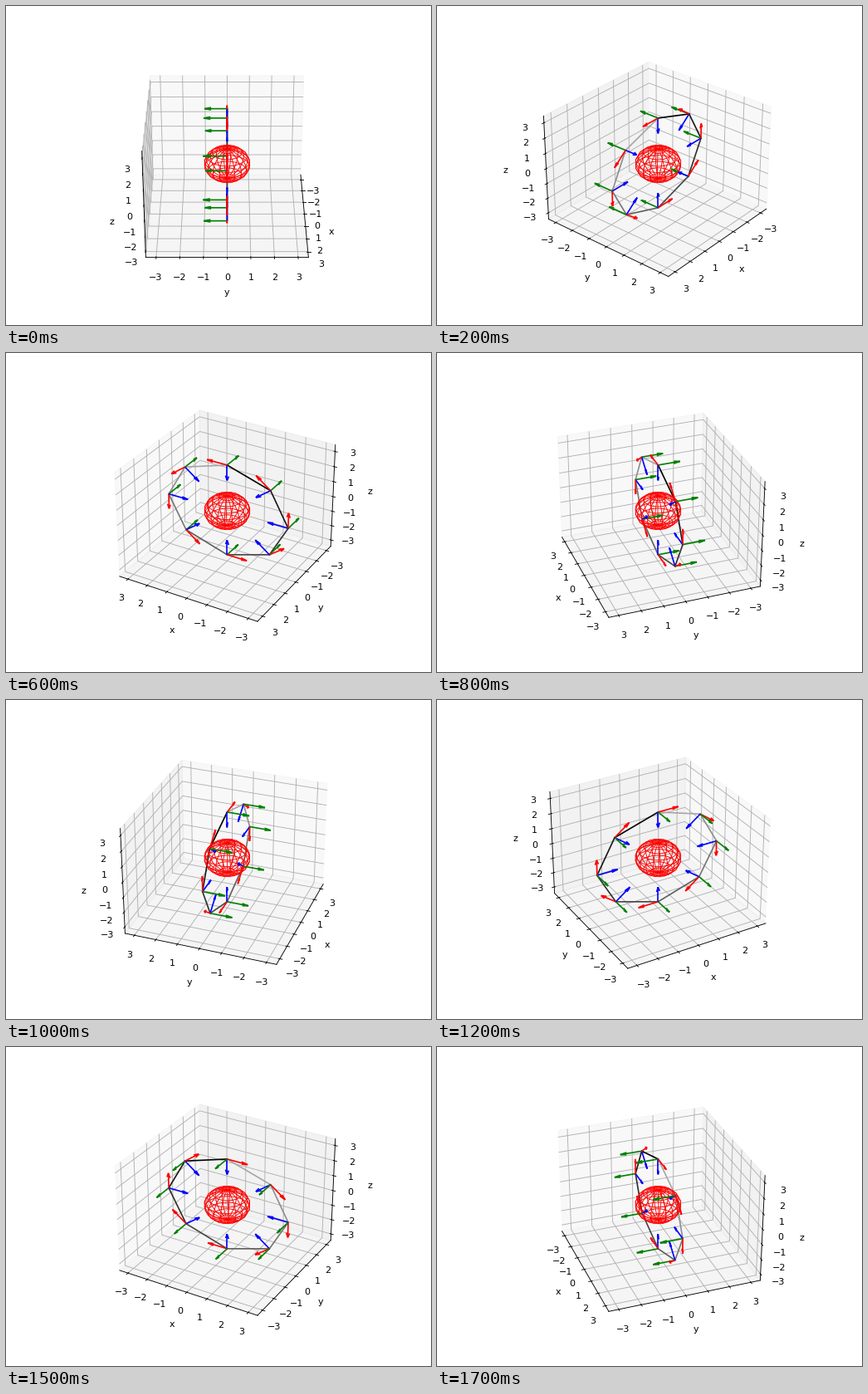
These frames come from a looping animation (512x384 px, 1.8 s). A matplotlib script:

```python
import numpy as np
import matplotlib.pyplot as plt
from matplotlib.animation import FuncAnimation

FRAMES, INTERVAL = 18, 100
NODES, RADIUS = 8, 3.0
LIMIT = RADIUS * 1.1 * 25 / 24  # a little air around the ring

fig = plt.figure(figsize=(6.4, 4.8), dpi=80)
ax = fig.add_subplot(projection="3d")

# Wireframe ball in the middle
u, v = np.mgrid[0:2 * np.pi:20j, 0:np.pi:10j]
ax.plot_wireframe(np.cos(u) * np.sin(v), np.sin(u) * np.sin(v), np.cos(v),
                  color="r", linewidth=0.8)

# Ring of poses in the x-z plane, each looking at the centre
theta = np.arange(NODES) * 2 * np.pi / NODES
zero = np.zeros(NODES)
radial = np.array([np.sin(theta), zero, np.cos(theta)])
tangent = np.array([np.cos(theta), zero, -np.sin(theta)])
down = np.array([zero, zero - 1, zero])
nodes = RADIUS * radial

# Path that darkens along its way round
for i, shade in enumerate(np.linspace(0.65, 0, NODES)):
    ax.plot(*nodes[:, [i, (i + 1) % NODES]], color=str(shade))

for direction, color in ((tangent, "r"), (down, "g"), (-radial, "b")):
    ax.quiver(*nodes, *direction, color=color, length=1)

span = (-LIMIT, LIMIT)
ax.set(xlim=span, ylim=span, zlim=span, xlabel="x", ylabel="y", zlabel="z")


def update(i):
    # The tiny offset settles which side pane is the far one
    ax.view_init(elev=30, azim=i * 360 / FRAMES + 1e-3)
    return []


anim = FuncAnimation(fig, update, frames=FRAMES, interval=INTERVAL,
                     init_func=lambda: update(0), repeat=True, repeat_delay=0)
plt.show()
```
